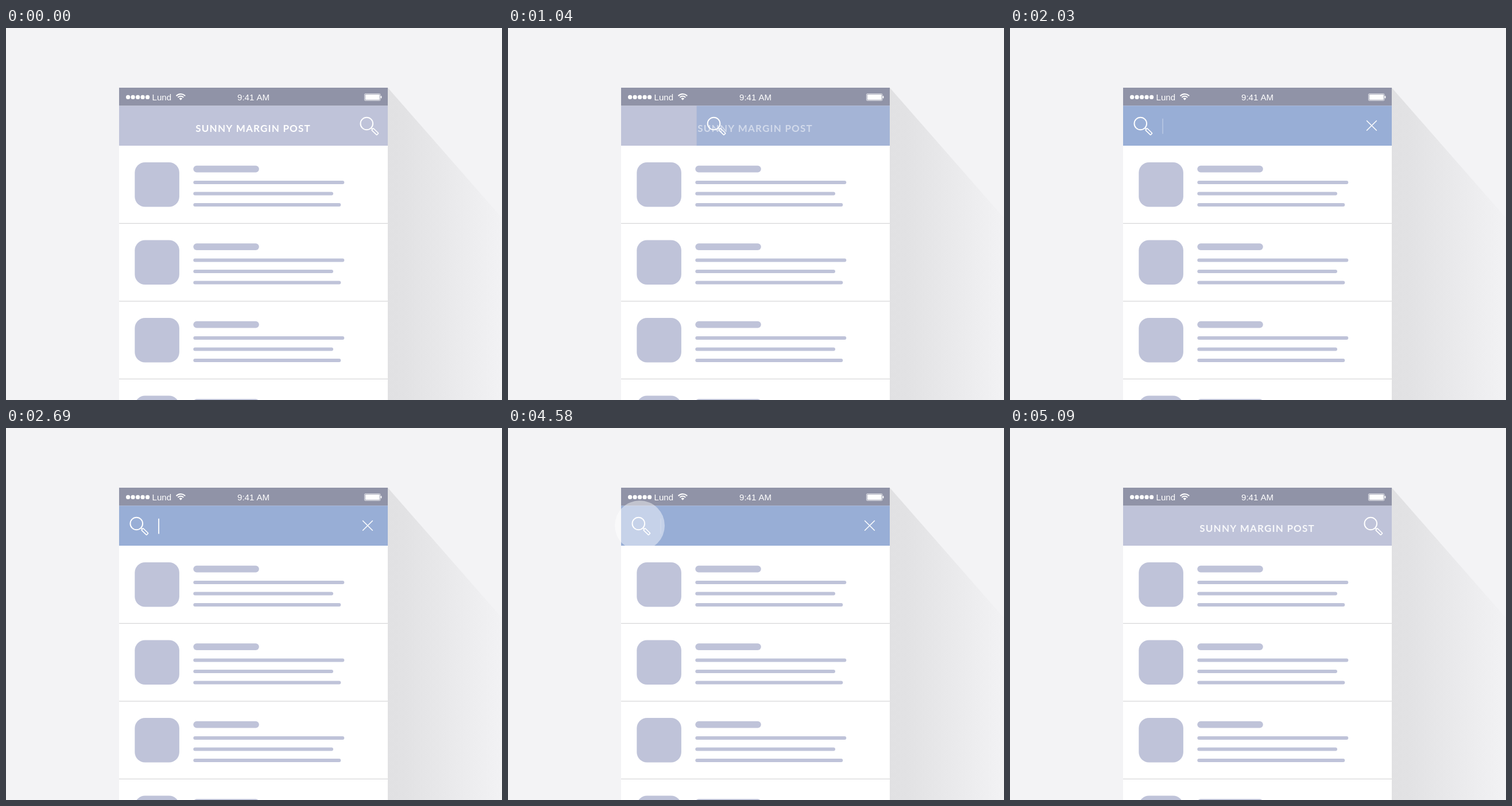
An HTML page with a canvas for the animation above (6380 ms loop, 864 px wide and 648 px high).

```html
<!DOCTYPE html>
<html lang="en">
<head>
<meta charset="utf-8">
<title>Header search</title>
<style>
  html, body { margin: 0; width: 100%; height: 100%; overflow: hidden; background: #f3f3f5; }
  canvas { display: block; }
</style>
</head>
<body>
<canvas id="stage" width="864" height="648"></canvas>
<script>
const ctx = document.getElementById('stage').getContext('2d');
const LOOP = 6380;
const LEFT = 197, RIGHT = 665, HEADER_TOP = 135.5, HEADER_BOTTOM = 205;
const LAVENDER = '#bfc3d9';

const clamp01 = v => Math.min(1, Math.max(0, v));
const span = (t, start, end) => clamp01((t - start) / (end - start));
const easeInOut = p => p < 0.5 ? 2 * p * p : 1 - 2 * (1 - p) * (1 - p);

// Linear interpolation through [time, value] keys.
function track(t, keys) {
  if (t <= keys[0][0]) return keys[0][1];
  for (let i = 1; i < keys.length; i++) {
    const [t0, v0] = keys[i - 1], [t1, v1] = keys[i];
    if (t <= t1) return v0 + (v1 - v0) * (t - t0) / (t1 - t0);
  }
  return keys[keys.length - 1][1];
}

const TAPS = [
  { x: 630.5, y: 168.5, press: 140, release: 680, grow: 13, power: 3.6 },
  { x: 229.5, y: 170, press: 4100, release: 4550, grow: 22, power: 2.44 }
];
const TITLE_ALPHA = [[0, 1], [900, 1], [1180, 0], [4760, 0], [5090, 0.88], [LOOP, 0.88]];
const CLOSE_ALPHA = [[1100, 0], [1310, 1], [4590, 1], [4970, 0]];
const CURSOR_ALPHA = [
  [1190, 0], [1340, 1], [1490, 1], [2240, 0], [2360, 0], [2690, 1], [2930, 1],
  [3440, 0], [3590, 0], [3830, 1], [4310, 1], [4580, 0.15], [4640, 0]
];

function rect(x, y, w, h, color) {
  ctx.fillStyle = color;
  ctx.fillRect(x, y, w, h);
}

function rounded(x, y, w, h, r, color) {
  ctx.fillStyle = color;
  ctx.beginPath();
  ctx.roundRect(x, y, w, h, r);
  ctx.fill();
}

function disc(x, y, r) {
  ctx.beginPath();
  ctx.arc(x, y, r, 0, Math.PI * 2);
  ctx.fill();
}

function withAlpha(alpha, paint) {
  if (alpha <= 0) return;
  ctx.save();
  ctx.globalAlpha = alpha;
  paint();
  ctx.restore();
}

function drawBackdrop() {
  rect(0, 0, 864, 648, '#f3f3f5');
  const shade = ctx.createLinearGradient(RIGHT, 0, 864, 0);
  shade.addColorStop(0, '#e1e1e3');
  shade.addColorStop(0.15, '#e2e2e4');
  shade.addColorStop(1, '#f2f2f4');
  ctx.fillStyle = shade;
  ctx.beginPath();
  ctx.moveTo(RIGHT, 104);
  ctx.lineTo(864, 331);
  ctx.lineTo(864, 648);
  ctx.lineTo(RIGHT, 648);
  ctx.fill();
}

function drawList() {
  rect(LEFT, HEADER_BOTTOM, RIGHT - LEFT, 648 - HEADER_BOTTOM, '#fff');
  for (let row = 0; row < 4; row++) {
    const y = HEADER_BOTTOM + row * 135.5;
    rounded(224.3, y + 29, 77.6, 77.6, 18, LAVENDER);
    rounded(326.3, y + 34.8, 114.5, 11.6, 5.8, LAVENDER);
    [263, 243.7, 257].forEach((width, i) =>
      rounded(326.3, y + 61 + i * 19.5, width, 6, 3, LAVENDER));
    rect(LEFT, y + 134.8, RIGHT - LEFT, 1.2, '#d6d6d8');
  }
}

function drawStatusBar() {
  rect(LEFT, 104, RIGHT - LEFT, HEADER_TOP - 104, '#9093a7');
  ctx.fillStyle = '#fff';
  for (let i = 0; i < 5; i++) disc(212.6 + i * 8.5, 120.4, 3.6);

  ctx.font = '15px "Liberation Sans", Arial, sans-serif';
  ctx.letterSpacing = '0px';
  ctx.textAlign = 'left';
  ctx.fillText('Lund', 254.6, 126);
  ctx.textAlign = 'center';
  ctx.fillText('9:41 AM', 431, 126);

  ctx.strokeStyle = '#fff';
  ctx.lineWidth = 2;
  const mid = -Math.PI / 2, half = 0.84;
  for (const r of [10.4, 6.6]) {
    ctx.beginPath();
    ctx.arc(304.3, 125.3, r, mid - half, mid + half);
    ctx.stroke();
  }
  ctx.beginPath();
  ctx.moveTo(304.3, 125.8);
  ctx.arc(304.3, 125.3, 3.6, mid - half, mid + half);
  ctx.fill();

  ctx.strokeStyle = 'rgba(255,255,255,.7)';
  ctx.lineWidth = 1;
  ctx.beginPath();
  ctx.roundRect(624.5, 114.5, 27.5, 12, 1.5);
  ctx.stroke();
  rounded(625.8, 115.7, 25, 9.6, 0.8, '#fff');
  rounded(652.4, 118.2, 2, 4.4, 0.8, '#fff');
}

function drawMagnifier(shift) {
  ctx.save();
  ctx.translate(628.3 - shift, 166.5);
  ctx.strokeStyle = '#fff';
  ctx.lineWidth = 2;
  ctx.beginPath();
  ctx.arc(0, 0, 10.8, 0, Math.PI * 2);
  ctx.stroke();
  ctx.rotate(Math.PI / 4.1);
  ctx.lineWidth = 1.7;
  ctx.beginPath();
  ctx.moveTo(11, 0);
  ctx.lineTo(14, 0);
  ctx.roundRect(14, -2.1, 12.4, 4.2, 0.8);
  ctx.stroke();
  ctx.restore();
}

function drawTap(t, tap) {
  const p = span(t, tap.release, tap.release + 270);
  const alpha = 0.5 * span(t, tap.press, tap.press + 90) * (1 - p);
  const radius = 38 + tap.grow * (1 - Math.pow(1 - p, tap.power));
  withAlpha(alpha, () => {
    ctx.fillStyle = '#fff';
    disc(tap.x, tap.y, radius);
  });
}

function drawHeader(t) {
  const height = HEADER_BOTTOM - HEADER_TOP;
  const back = easeInOut(span(t, 4760, 5090));
  const slide = easeInOut(span(t, 800, 1203)) - back;
  const cover = easeInOut(span(t, 790, 1190)) - back;

  rect(LEFT, HEADER_TOP, RIGHT - LEFT, height, LAVENDER);
  withAlpha(slide, () => {
    const width = (RIGHT - LEFT) * cover;
    rect(RIGHT - width, HEADER_TOP, width, height, '#98aed6');
  });

  withAlpha(track(t, CURSOR_ALPHA), () => rect(265.2, 157.8, 1.8, 26.6, '#fff'));
  TAPS.forEach(tap => drawTap(t, tap));

  withAlpha(track(t, TITLE_ALPHA), () => {
    ctx.fillStyle = '#fff';
    ctx.font = 'bold 17px Lato, sans-serif';
    ctx.letterSpacing = '1.2px';
    ctx.textAlign = 'center';
    ctx.fillText('SUNNY MARGIN POST', 430.6, 181);
  });

  withAlpha(track(t, CLOSE_ALPHA), () => {
    ctx.strokeStyle = '#fff';
    ctx.lineWidth = 1.5;
    ctx.beginPath();
    for (const dir of [1, -1]) {
      ctx.moveTo(630 - 8.8 * dir, 161.2);
      ctx.lineTo(630 + 8.8 * dir, 178.8);
    }
    ctx.stroke();
  });

  drawMagnifier(401 * slide);
}

function render(now) {
  const t = Math.floor((now % LOOP + 10) / 30) * 30 - 10;
  drawBackdrop();
  drawList();
  drawStatusBar();
  drawHeader(t);
}

const startTime = performance.now();
function tick() {
  render(performance.now() - startTime);
  requestAnimationFrame(tick);
}
tick();
</script>
</body>
</html>
```
